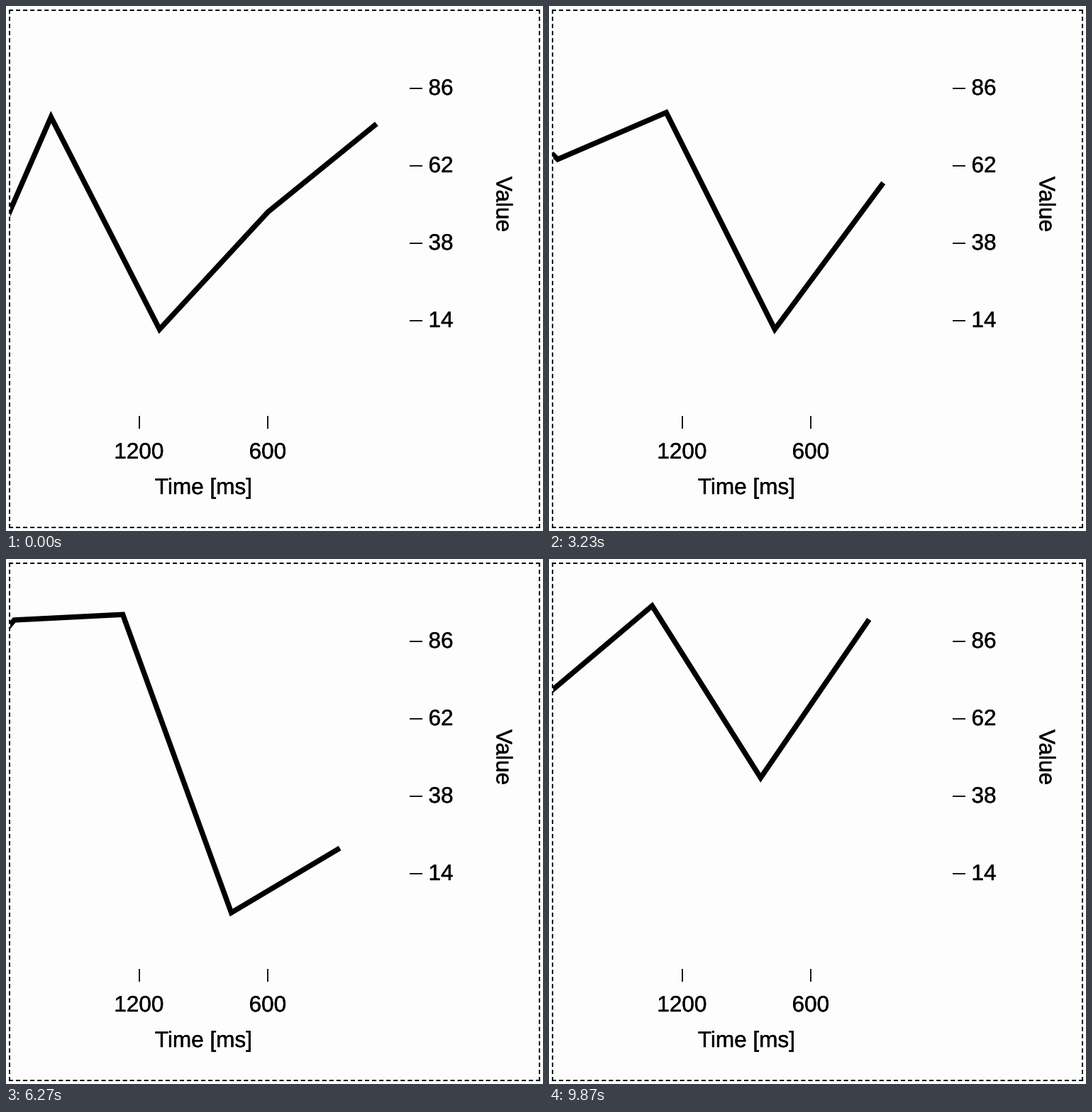
A matplotlib script that plays this animation: 757 px wide and 739 px high, repeating every 9.91 s.

```python
import matplotlib.pyplot as plt
import numpy as np
from matplotlib.animation import FuncAnimation
from matplotlib.patches import Rectangle
from matplotlib.patheffects import withStroke

W, H, DPI = 757, 739, 128
PT = 72 / DPI  # points per pixel
LOOP, FRAMES = 9910, 297
BLACK, PAPER = "#000000", "#fdfdfd"
LEFT, TOP, RIGHT, BOTTOM = 5, 6, 752, 734

# Corners of the plotted line, oldest first, spaced evenly in time.
VALUES = np.array([
    0, 77, 11.2, 47.6, 74.9, 74.3, 96.2, 63.9, 78.4, 11.2, 56.6, 64.5,
    52.6, 92.5, 94.2, 1.8, 21.8, 13.4, 62.5, 70.2, 68.5, 96.9, 43.6, 92.7,
])
BIRTHS = -93 + 505.7 * (np.arange(len(VALUES)) - 4)

plt.rcParams["font.family"] = "Liberation Sans"
fig = plt.figure(figsize=(W / DPI, H / DPI), dpi=DPI, facecolor=PAPER)
ax = fig.add_axes([0, 0, 1, 1])
ax.set(xlim=(0, W), ylim=(H, 0))
ax.axis("off")


def x_of(age):
    return 550.5 - 0.3025 * age


def y_of(value):
    return 506 - 109 / 24 * value


def stroke(xs, ys, **style):
    return ax.plot(xs, ys, color=BLACK, solid_capstyle="butt",
                   dash_capstyle="butt", **style)[0]


def dashed(xs, ys, dash=6, gap=4):
    """Dashed side whose gaps are adjusted so that it ends on a dash."""
    length = abs(xs[1] - xs[0]) + abs(ys[1] - ys[0])
    count = round((length + gap) / (dash + gap))
    gap = (length - count * dash) / (count - 1)
    stroke(xs, ys, lw=2 * PT, ls=(0, (dash / (2 * PT) * PT, gap / 2)))


def label(x, y, text, ha="center", rotation=0):
    ax.text(x, y, text, fontsize=31.5 * PT, color=BLACK, ha=ha, va="baseline",
            rotation=rotation, rotation_mode="anchor",
            path_effects=[withStroke(linewidth=0.4 * PT, foreground=BLACK)])


for y in (TOP, BOTTOM):
    dashed([LEFT - 1, RIGHT + 1], [y, y])
for x in (LEFT, RIGHT):
    dashed([x, x], [TOP - 1, BOTTOM + 1])

for value in (86, 62, 38, 14):
    y = y_of(value) + 0.6
    stroke([569, 587], [y, y], lw=1.8 * PT)
    label(595.5, y + 9, str(value), ha="left")

for age in (1200, 600):
    x = x_of(age)
    stroke([x, x], [577, 595], lw=1.8 * PT)
    label(x, 637, str(age))

label(278.5, 687, "Time [ms]")
label(691.5, 279, "Value", rotation=270)

line = stroke([], [], lw=7.4 * PT, solid_joinstyle="miter", snap=False)
line.set_clip_path(Rectangle((LEFT + 1, TOP + 1), RIGHT - LEFT - 2,
                             BOTTOM - TOP - 2, transform=ax.transData))


def draw(frame):
    now = frame * LOOP / FRAMES
    born = BIRTHS <= now
    line.set_data(x_of(now - BIRTHS[born]), y_of(VALUES[born]))
    return line,


anim = FuncAnimation(fig, draw, frames=FRAMES, interval=LOOP / FRAMES,
                     repeat=True, repeat_delay=0, blit=True)
plt.show()
```
